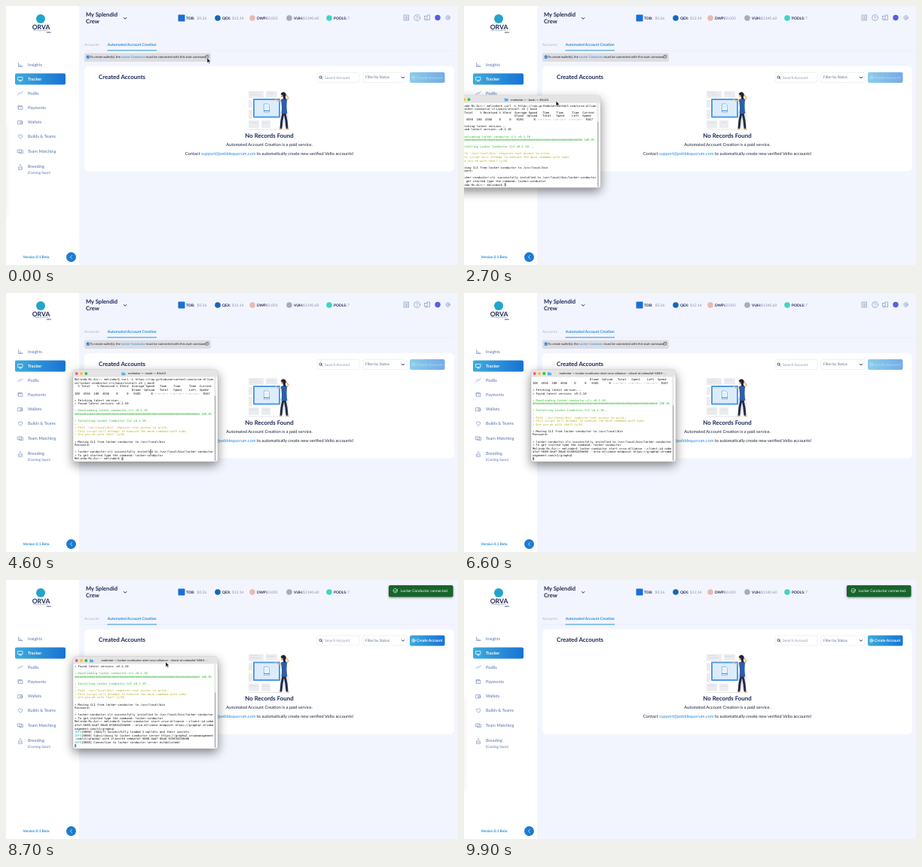
Recreate the animation shown at these times as an HTML page. Size 600x344 px, loop 10 s.

```html
<!DOCTYPE html>
<html lang="en">
<head>
<meta charset="utf-8">
<title>Account creation</title>
<style>
html, body { margin: 0; width: 100%; height: 100%; overflow: hidden; background: #f3f5fe; }
svg { display: block; width: 600px; height: 344px; }
text { font-family: Lato, "Open Sans", sans-serif; text-rendering: geometricPrecision; white-space: pre; }
.b { font-weight: 700; }
.mid { text-anchor: middle; }
.navy { fill: #1c2857; }
.link { fill: #2389d8; }
.line { fill: none; stroke: #8295c0; stroke-width: .7; stroke-linecap: round; stroke-linejoin: round; }
.white { stroke: #fff; }
#term { filter: drop-shadow(0 5px 7px #0007); }
#lines text { font: 3.84px "DejaVu Sans Mono", "Liberation Mono", monospace; }
#title { font: 700 3.75px Inter, sans-serif; fill: #555; text-anchor: middle; }
.toast { filter: drop-shadow(0 1px 1.5px #0006); }
</style>
</head>
<body>
<svg viewBox="0 0 600 344">
  <defs>
    <linearGradient id="blue"><stop stop-color="#3eabdc"/><stop offset="1" stop-color="#1873d4"/></linearGradient>
  </defs>
  <rect width="600" height="344" fill="#f3f5fe"/>
  <rect width="97" height="344" fill="#fff"/>

  <!-- Brand -->
  <circle cx="46" cy="17" r="6" fill="#22a5cb"/>
  <text class="b mid navy" x="46.5" y="31" font-size="8.6">ORVA</text>
  <text class="mid navy" x="46.5" y="33.2" font-size="2.3" letter-spacing=".7">Management</text>
  <text class="b mid navy" x="57" y="35.5" font-size="2.4">BETA</text>

  <!-- Sidebar -->
  <rect x="12" y="89.5" width="67" height="15" rx="2" fill="url(#blue)"/>
  <g id="menu"></g>
  <text x="29" y="222.7" font-size="4.7" fill="#536fae">(Coming Soon)</text>
  <text class="b link" x="22.5" y="334.8" font-size="4.8">Version 0.1 Beta</text>
  <circle cx="86.5" cy="333.5" r="6.5" fill="#1b7bd3"/>
  <path d="M87.6 331.2l-2.2 2.3 2.2 2.3" class="line white"/>

  <!-- Header -->
  <text class="b navy" x="106" y="14.4" font-size="7.6">My Splendid</text>
  <text class="b navy" x="106" y="23" font-size="7.6">Crew</text>
  <path d="M156.5 15.5l1.7 1.8 1.7-1.8" class="line" style="stroke:#1c2857;stroke-width:1"/>
  <g id="coins"></g>
  <g class="line">
    <path d="M528.5 12h6v7h-6zM530 14h3M530 15.7h3M530 17.3h3"/>
    <circle cx="545.7" cy="15.5" r="4"/>
    <path d="M544.6 14.5a1.1 1.1 0 1 1 1.7 1q-.6.3-.6 1M545.7 17.7v.1"/>
    <path d="M555.5 13.5h3M555.5 13.5v4.5h2M559.5 12h3v6.5h-3zM557 17l1.5 1.3-1.5 1.3"/>
    <circle cx="586.7" cy="15.5" r="1.2"/>
    <circle cx="586.7" cy="15.5" r="2.8" stroke-dasharray="1.5 .7"/>
  </g>
  <circle cx="573" cy="15.5" r="3.7" fill="#5561dd"/>

  <!-- Tabs -->
  <text x="104" y="52.9" font-size="4.9" fill="#a6b2cf">Accounts</text>
  <text class="b link" x="134.8" y="52.9" font-size="5">Automated Account Creation</text>
  <path d="M104 59.3H595" stroke="#e0e5f2" stroke-width=".5"/>
  <path d="M134.5 59H200" stroke="#2b93d9"/>

  <g id="banner">
    <rect x="104" y="62.5" width="168" height="11.5" rx="2" fill="#dcdde3"/>
    <circle cx="108.8" cy="67.8" r="2.2" fill="#1976d2"/>
    <path d="M107.8 67.8l.8.8 1.3-1.5" class="line white"/>
    <text x="111.5" y="69.3" font-size="4.15" fill="#222">To create wallet(s), the <tspan class="link">Locker Conductor</tspan> must be connected with this start command</text>
    <path d="M265.3 66h2.6v3.3h-2.6zM266.3 66v-.8h2.5v3.3h-.9" class="line" style="stroke:#555;stroke-width:.5"/>
  </g>

  <g id="card">
    <rect x="104" y="80" width="491" height="139.5" rx="6" fill="#fff"/>
    <text class="b navy" x="123" y="96.8" font-size="7.9">Created Accounts</text>
    <g fill="#fff" stroke="#e2e7f2" stroke-width=".6">
      <rect x="413" y="88.5" width="56" height="13" rx="2"/>
      <rect x="474" y="88.5" width="58" height="13" rx="2"/>
    </g>
    <g class="line" style="stroke:#1c2857">
      <circle cx="417.5" cy="94.6" r="1.6"/>
      <path d="M418.7 95.8l1.2 1.2"/>
      <path d="M525.3 94.2l1.7 1.7 1.7-1.7" stroke-width="1"/>
    </g>
    <text x="423" y="96.6" font-size="4.9" fill="#8a96ad">Search Account</text>
    <text x="477" y="96.4" font-size="4.9" fill="#5b6a8c">Filter by Status</text>
    <rect x="536" y="88" width="46.5" height="14" rx="2" fill="url(#blue)" id="button"/>
    <g id="label">
      <circle cx="541" cy="95" r="2.2" class="line white"/>
      <path d="M540 95h2M541 94v2" class="line white"/>
      <text class="b" x="545" y="96.7" font-size="5" fill="#fff">Create Account</text>
    </g>

    <!-- Illustration -->
    <path d="M322 113h20v9h-20zM345 113h15v8h-15zM322 125h5v10h-5zM322 138h5v12h-5zM322 152h14v10h-14zM339 152h12v10h-12zM364 140h11v20h-11z" fill="#ebecef"/>
    <path d="M324 115h10M324 118h14M347 116h9M324 155h9M341 155h7" stroke="#d7d9df" stroke-width=".8"/>
    <path d="M322 164H377" stroke="#c9cbd3" stroke-width=".5"/>
    <rect x="328" y="123" width="36" height="25.5" rx="1" fill="#4f9be8"/>
    <rect x="330" y="125" width="32" height="21.5" fill="#dcecfb"/>
    <path d="M342.5 130h5l2 2v9h-7z" fill="#fff" stroke="#4f9be8" stroke-width=".6"/>
    <path d="M344 133.5h4M344 135.5h4" stroke="#8cbcf0" stroke-width=".5"/>
    <path d="M342 139h8" stroke="#4f9be8" stroke-width="1.4"/>
    <g fill="none" stroke-linecap="round" stroke-linejoin="round">
      <path d="M368 142l-2 10-1 10M370 142l2 10 1 10" stroke="#252c49" stroke-width="3"/>
      <path d="M363.5 163.2h2M372.5 163.2h2.5" stroke="#e79b45" stroke-width="1.3"/>
      <path d="M366 126l-5 0-3-2M372 126l3-4-4-5" stroke="#f0b27c" stroke-width="1.5"/>
    </g>
    <path d="M365 124q4-2 8 0l-.5 9 .7 10h-7.5l.3-9z" fill="#2e5ea9"/>
    <circle cx="367.5" cy="119" r="2.5" fill="#f0b27c"/>
    <path d="M364.5 117q2-4 5.5-2.3 3 2 .8 6.3l1 3h-3.3l-1-5z" fill="#20243a"/>

    <text class="b mid navy" x="349.5" y="174.7" font-size="7.9">No Records Found</text>
    <text class="mid" x="349.5" y="186" font-size="5.7" fill="#1d2440">Automated Account Creation is a paid service.</text>
    <text class="mid" x="349.5" y="198" font-size="5.7" fill="#1d2440">Contact <tspan class="link">support@pebblequorum.com</tspan> to automatically create new verified Velto accounts!</text>
  </g>

  <g id="copied" class="toast">
    <rect x="6" y="322" width="37" height="16" rx="2" fill="#1b7dce"/>
    <circle cx="15.2" cy="330" r="2.7" class="line white"/>
    <path d="M15.2 329.8v1.5M15.2 328.6v.1" class="line white"/>
    <text class="b" x="23" y="331.7" font-size="4.9" fill="#fff">Copied</text>
  </g>

  <g id="connected" class="toast">
    <rect x="508" y="7" width="85.5" height="15.5" rx="2" fill="#17652b"/>
    <path d="M519 12.6a2.7 2.7 0 1 1-1.3-1M515.7 14.2l1.2 1.2 2.7-3" class="line white"/>
    <text x="524" y="16.2" font-size="4.9" fill="#fff">Locker Conductor connected.</text>
  </g>

  <g id="term">
    <rect x="89" y="102" width="192" height="122" rx="3" fill="#fff" stroke="#aaa" stroke-width=".4"/>
    <path d="M89 111.5v-6.5a3 3 0 0 1 3-3h186a3 3 0 0 1 3 3v6.5z" fill="#e5e3e5"/>
    <circle cx="93.7" cy="107" r="1.9" fill="#fc5f57"/>
    <circle cx="100" cy="107" r="1.9" fill="#fdbc2e"/>
    <circle cx="106.3" cy="107" r="1.9" fill="#29c83f"/>
    <path id="folder" d="M-2.5-1.8h2l.6.7h2.4v3.3h-5z" fill="#58b1e6"/>
    <text id="title" y="108.4"></text>
    <path d="M277.5 111.5V223.5" stroke="#ececec" stroke-width="3"/>
    <path id="thumb" stroke="#b9b9b9" stroke-width="1.5" stroke-linecap="round"/>
    <g id="lines"></g>
    <rect id="caret" width="2.2" height="4.2" fill="#8e8e8e"/>
  </g>

  <path id="arrow" d="M0 0v6.5l1.6-1.4 1 2.3 1-.4-1-2.3h2.1z" fill="#111" stroke="#fff" stroke-width=".4"/>
  <path id="beam" d="M-1-3q1 0 1 .8v4.4q0 .8-1 .8M1-3q-1 0-1 .8M1 3q-1 0-1-.8" fill="none" stroke="#222" stroke-width=".5"/>
</svg>
<script>
const $ = id => document.getElementById(id);
const show = (id, on) => $(id).style.opacity = +on;
const place = (id, x, y) => $(id).setAttribute('transform', `translate(${x} ${y})`);

// Sidebar entries: label, row centre, icon drawn around (0,0)
const menu = [
  ['Insights', 78, 'M-2.5-2.5v5h5.5M-1 2.5v-3M.7 2.5v-2M2.3 2.5v-1'],
  ['Tracker', 97, 'M-3-2.5h6v4h-6zM-1.5 3h3M0 1.5v1.5'],
  ['Podlis', 116, 'M-3 2l2-3 1.7 1.5 2.3-3'],
  ['Payments', 135, 'M-2-1.5h5v4h-5zM-3 1v-3.5h5M0 .5h1'],
  ['Wallets', 154.5, 'M-3-2h5.5v4.5h-5.5zM0-.5h3v1.7h-3z'],
  ['Builds &amp; Teams', 173.5, 'M0 2.7l-2.5-2.6q-.8-2.4 1.2-2.6 1 0 1.3 1 .3-1 1.3-1 2 .2 1.2 2.6z'],
  ['Team Matching', 193, 'M-3.5-2.2h5v3.7h-5zM-1.5 1.5v1h5v-3.7h-2M-2-.5h2'],
  ['Breeding', 213, 'M-2.5 4q-.5-4 2.5-5.5 3 1.5 2.5 5.5zM-2 2h4M0-1.5v-1.3']
];
$('menu').innerHTML = menu.map(([name, y, d], i) => {
  const on = i === 1;
  return `<path class="line ${on ? 'white' : ''}" transform="translate(19 ${y})" d="${d}"/>
    <text x="29" y="${y + 1.9}" font-size="5.6" class="${on ? 'b' : ''}" fill="${on ? '#fff' : '#536fae'}">${name}</text>`;
}).join('');

const coins = [
  [233, 'TOB', '$0.26', 253.5, '#1a6fd8', true], [281, 'QEX', '$12.14', 300, '#1467b8'],
  [327, 'DWP', '$0.003', 345, '#e9b9b2'], [376, 'VUH', '$1340.60', 394, '#a9abb5'],
  [429, 'PODLS', '7', 453, '#3fd6c4']
];
$('coins').innerHTML = coins.map(([x, name, value, vx, color, square]) =>
  (square ? `<rect x="${x - 4.5}" y="11.5" width="9" height="9" rx="1" fill="${color}"/>`
          : `<circle cx="${x}" cy="16" r="3.8" fill="${color}"/>`) +
  `<text class="b navy" x="${x + 6}" y="17.9" font-size="4.9">${name}:</text>
   <text x="${vx}" y="17.9" font-size="5" fill="#8792ad">${value}</text>`).join('');

// Terminal session
const green = '#2eb52c', olive = '#b5ab1f';
const prompt = 'Melinda-Rs-Air:~ melindar$ ';
const tool = 'locker-conductor', org = 'orva-alliance';
const client = 'cebeafaf-5680-4ad7-86a8-815034258e00';
const url = 'https://graphql.orvamanagement.com/v1/graphql';
const wrap = (s, color = '#111') => (s.match(/.{1,80}/g) || ['']).map(text => ({ text, color }));
const log = [
  [`${prompt}curl -L https://raw.githubusercontent.com/${org}/${tool}-cli/main/install.sh | bash`],
  ['  % Total    % Received % Xferd  Average Speed   Time    Time     Time  Current'],
  ['                                 Dload  Upload   Total   Spent    Left  Speed'],
  ['100  4556  100  4556    0     0   9185      0 --:--:-- --:--:-- --:--:--  9167'],
  [''],
  ['→ Fetching latest version...'],
  ['→ Found latest version: v0.1.10'],
  [''],
  [`→ Downloading ${tool}-cli v0.1.10`, green],
  ['#'.repeat(72) + ' 100.0%', green],
  [''],
  ['→ Installing Locker Conductor CLI v0.1.10...', green],
  ['→', olive],
  ["→ Path '/usr/local/bin' requires root access to write.", olive],
  ['→ This script will attempt to execute the move command with sudo.', olive],
  ['→ Are you ok with that? (y/N)', olive],
  [''],
  [`→ Moving CLI from ${tool} to /usr/local/bin`],
  ['Password:'],
  [''],
  [`→ ${tool}-cli successfully installed to /usr/local/bin/${tool}`],
  [`→ To get started type the command: ${tool}`]
].flatMap(a => wrap(...a));
const command = `${tool} start ${org} --client-id ${client} --${org}-endpoint ${url}`;
const loaded = [
  'INFO[0000] [VAULT] Successfully loaded 2 wallets and their secrets',
  `INFO[0000] Subscribing to locker conductor server ${url} with clientId ${client}`
];
const done = 'INFO[0000] Connection to locker conductor server established!';

const rowY = i => 116.3 + i * 4.57;
let stage = -1;
function drawTerminal(next) {
  if (next === stage) return;
  stage = next;
  const tail = [prompt + (stage ? command : '')];
  if (stage > 2) tail.push(...loaded);
  if (stage > 3) tail.push(done);
  if (stage > 1) tail.push('');
  const rows = [...log, ...tail.flatMap(s => wrap(s))].slice(-24);
  $('lines').innerHTML = rows.map(({ text, color }, i) =>
    `<text x="91" y="${rowY(i)}" fill="${color}">${text.replace(/^INFO/, '<tspan fill="#25b5c4">INFO</tspan>')}</text>`).join('');
  place('caret', 91 + rows.at(-1).text.length * 2.312, rowY(rows.length - 1) - 3.4);
  const busy = stage > 1;
  $('title').textContent = 'melindar — ' + (busy ? `${tool} start ${org} --client-id cebeafaf-5680-…` : '-bash — 80x24');
  $('title').setAttribute('x', busy ? 197.5 : 187);
  place('folder', busy ? 113.5 : 156, 107);
  $('thumb').setAttribute('d', `M277.7 ${busy ? 150 : 137}V222`);
}

function frame(now) {
  const t = now % 10000;
  const clamp = v => Math.min(1, Math.max(0, v));
  const ease = (a, b) => { const u = clamp((t - a) / (b - a)); return u * u * (3 - 2 * u); };

  const online = t >= 8000;
  show('banner', !online);
  show('button', online ? 1 : .6);
  show('label', online ? 1 : .35);
  place('card', 0, online ? -14.6 : 0);
  show('connected', clamp((t - 7950) / 150));
  show('copied', clamp((t - 1150) / 100) * clamp((2450 - t) / 150));

  drawTerminal([5500, 6200, 7300, 7900].filter(at => t >= at).length);
  const away = 1 - ease(2150, 3060) + ease(8720, 9500);
  const dx = -290 * away, dy = 50 * away;
  place('term', dx, dy);

  // Pointer: fetch the window, rest in its text, then drag it away
  const reach = ease(1500, 2150), down = ease(3300, 4300), up = ease(8050, 8450);
  const held = t >= 2150;
  const x = held ? 222 + dx - 30 * down + 20 * up : 267 - 335 * reach;
  const y = held ? 109 + dy + 102 * (down - up) : 69 + 90 * reach;
  const typing = t >= 5500 && t < 8050, overText = held && away === 0 && y > 112;
  show('arrow', !typing && !overText);
  show('beam', !typing && overText);
  place('arrow', x, y);
  place('beam', x, y);
  requestAnimationFrame(frame);
}
requestAnimationFrame(frame);
</script>
</body>
</html>
```
